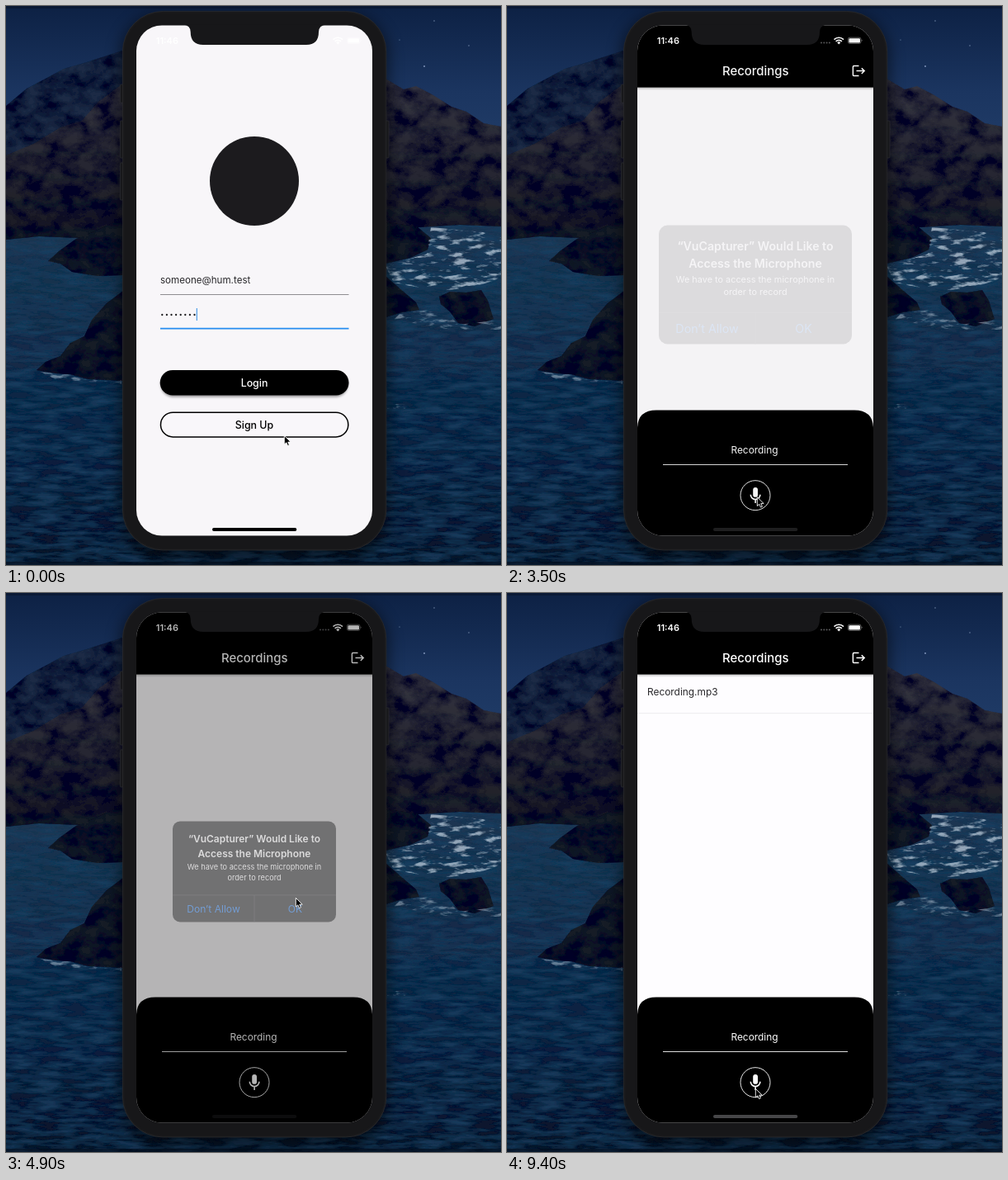
Write an HTML page that moves like this. It is 600 by 677 pixels and loops after 9500 ms.

```html
<!DOCTYPE html>
<html lang="en">
<head>
<meta charset="utf-8">
<title>Voice recorder demo</title>
<style>
html, body { margin: 0; width: 100%; height: 100%; overflow: hidden; background: #0b1a33; }
svg { position: absolute; left: 0; top: 0; width: 600px; height: 677px; display: block; }
text { font-family: Inter, Roboto, sans-serif; }
.mid { text-anchor: middle; }
.med { font-weight: 500; }
.bold { font-weight: 600; }
</style>
</head>
<body>
<svg viewBox="0 0 600 677">
  <defs>
    <linearGradient id="sky" x2="0" y2="1">
      <stop offset="0" stop-color="#0d2144"/>
      <stop offset=".35" stop-color="#1b3560"/>
      <stop offset="1" stop-color="#2b4a75"/>
    </linearGradient>
    <linearGradient id="sea" x2="0" y2="1">
      <stop offset="0" stop-color="#1c3652"/>
      <stop offset=".3" stop-color="#152d4a"/>
      <stop offset=".65" stop-color="#0c2140"/>
      <stop offset="1" stop-color="#061329"/>
    </linearGradient>
    <linearGradient id="hill" x2="0" y2="1">
      <stop offset="0" stop-color="#343440"/>
      <stop offset=".6" stop-color="#24252f"/>
      <stop offset="1" stop-color="#171a24"/>
    </linearGradient>
    <filter id="rough" x="0" y="0" width="1" height="1">
      <feTurbulence type="fractalNoise" baseFrequency=".045 .06" numOctaves="5" seed="7"/>
      <feColorMatrix values="0 0 0 0 0  0 0 0 0 0  0 0 0 0 .02  2.4 0 0 0 -.8"/>
      <feComposite in2="SourceGraphic" operator="in" result="n"/>
      <feMerge><feMergeNode in="SourceGraphic"/><feMergeNode in="n"/></feMerge>
    </filter>
    <filter id="waves" x="0" y="0" width="1" height="1">
      <feTurbulence type="fractalNoise" baseFrequency=".03 .16" numOctaves="4" seed="3"/>
      <feColorMatrix values="0 0 0 0 .01  0 0 0 0 .05  0 0 0 0 .12  1.8 0 0 0 -.62"/>
      <feComposite in2="SourceGraphic" operator="in" result="n"/>
      <feMerge><feMergeNode in="SourceGraphic"/><feMergeNode in="n"/></feMerge>
    </filter>
    <filter id="foam" x="0" y="0" width="1" height="1">
      <feTurbulence type="fractalNoise" baseFrequency=".05 .15" numOctaves="4" seed="11"/>
      <feColorMatrix values="0 0 0 0 .5  0 0 0 0 .6  0 0 0 0 .7  5 0 0 0 -2.6"/>
      <feComposite in2="SourceGraphic" operator="in"/>
    </filter>
    <filter id="soft" x="-20%" y="-20%" width="140%" height="140%"><feGaussianBlur stdDeviation="9"/></filter>
  </defs>
  <rect width="600" height="300" fill="url(#sky)"/>
  <g fill="#7f95b8"><circle cx="507" cy="73" r="1"/><circle cx="519" cy="18" r=".7"/><circle cx="561" cy="48" r=".7"/><circle cx="546" cy="125" r=".7"/><circle cx="477" cy="41" r=".6"/></g>
  <path d="M0 121L25 100 48 88 70 76 98 68 141 54V290H0Z" fill="#1b2b44" filter="url(#rough)"/>
  <rect y="264" width="600" height="413" fill="url(#sea)" filter="url(#waves)"/>
  <g fill="url(#hill)" filter="url(#rough)">
    <path d="M0 181L35 166 66 147 92 139 112 116 142 94V275L90 281 40 279 0 283Z"/>
    <path d="M460 88L482 101 497 97 518 108 540 122 558 128 579 142 600 146V267L550 265 500 268 460 300Z"/>
  </g>
  <g fill="#181c27" filter="url(#rough)">
    <path d="M51 309L64 297 85 282 105 274 142 257V326L110 327 80 322 66 312Z"/>
    <path d="M37 441L48 431 66 424 78 408 95 400 104 380 122 360 142 345V454L100 452 78 446 60 445Z"/>
    <path d="M460 262L498 267 515 281 511 295 490 305 460 312Z"/>
    <path d="M460 327L476 341 497 359 501 368 480 371 460 377Z"/>
    <path d="M525 352L538 346 558 347 576 344 584 357 591 379 568 388 548 384 538 370 527 361Z"/>
  </g>
  <path d="M515 268L600 276V330L560 342 520 345 470 335 460 315 510 300Z" fill="#fff" filter="url(#foam)" opacity=".75"/>
  <path d="M478 372L530 366 548 386 600 380V392L540 392 470 380ZM42 443L140 453V458L60 452ZM462 482h22v6h-22z" fill="#fff" filter="url(#foam)" opacity=".5"/>
  <rect width="600" height="3" fill="#081226" opacity=".5"/>
  <rect y="673" width="600" height="4" fill="#040c1c" opacity=".6"/>
  <rect x="138" y="10" width="326" height="660" rx="50" opacity=".5" filter="url(#soft)"/>
</svg>

<svg viewBox="0 0 600 677">
  <defs>
    <clipPath id="screen"><rect x="158" y="23.5" width="286" height="618" rx="31"/></clipPath>
    <linearGradient id="edge" x2="0" y2="1">
      <stop stop-color="#000" stop-opacity=".28"/><stop offset="1" stop-color="#000" stop-opacity="0"/>
    </linearGradient>
    <filter id="lift" x="-5%" y="-20%" width="110%" height="150%"><feGaussianBlur stdDeviation="1.6"/></filter>
  </defs>
  <g fill="#17181b" stroke="#303136" stroke-width=".6">
    <rect x="138.4" y="95" width="4" height="22" rx="1"/>
    <rect x="138.4" y="139" width="4" height="45" rx="1"/>
    <rect x="138.4" y="190" width="4" height="45" rx="1"/>
    <rect x="460" y="139" width="4" height="45" rx="1"/>
  </g>
  <rect x="141.4" y="6.4" width="319.4" height="652.6" rx="49" fill="#19191b" stroke="#2b2b2e" stroke-width=".8"/>
  <rect x="144" y="9" width="314" height="647.5" rx="46" fill="#171719"/>

  <g clip-path="url(#screen)">
    <g id="login">
      <rect x="158" y="23" width="286" height="619" fill="#f8f6f9"/>
      <circle cx="301" cy="212" r="54" fill="#1c1b1e"/>
      <text x="187" y="336" font-size="11.6" fill="#29282b">someone@hum.test</text>
      <path d="M187 349.5H415.5" stroke="#8f8d91"/>
      <g id="dots" fill="#1d1c1f"></g>
      <rect id="caret" x="230.7" y="366" width="1.3" height="15" fill="#5aa2e8"/>
      <path d="M187 390.7H415.5" stroke="#268df0" stroke-width="1.7"/>
      <rect x="187.5" y="443" width="227" height="30.5" rx="15.2" opacity=".4" filter="url(#lift)"/>
      <rect x="186.7" y="441" width="228.8" height="30.6" rx="15.3"/>
      <text class="mid med" x="301" y="461" font-size="12.4" fill="#fff">Login</text>
      <rect x="187.5" y="492.2" width="227.3" height="29.7" rx="14.8" fill="#f9f7fa" stroke="#000" stroke-width="1.5"/>
      <text class="mid med" x="301" y="511.6" font-size="12.4">Sign Up</text>
    </g>

    <g id="home">
      <rect x="158" y="23" width="286" height="619" fill="#fefdff"/>
      <rect x="158" y="98" width="286" height="4" fill="url(#edge)"/>
      <rect x="158" y="23" width="286" height="75.6"/>
      <text class="mid med" x="301.2" y="83.6" font-size="14.9" fill="#fff">Recordings</text>
      <path d="M426.5 72.6H420.6Q419.4 72.6 419.4 73.8V83.4Q419.4 84.6 420.6 84.6H426.5M423.5 78.6H433M429.8 75.2L433.2 78.6 429.8 82" fill="none" stroke="#fff" stroke-width="1.5"/>
      <g id="item">
        <text x="170" y="123.6" font-size="11.9" fill="#29282b">Recording.mp3</text>
        <path d="M158 145.7H444" stroke="#ebeaec" stroke-width=".9"/>
      </g>
      <path d="M158 642V512Q158 489.5 181 489.5H421Q444 489.5 444 512V642Z"/>
      <text class="mid" x="300" y="542.2" font-size="11.9" fill="#fff">Recording</text>
      <path d="M189 555.5H413" stroke="#dedede"/>
      <circle cx="301" cy="592.7" r="18" fill="none" stroke="#e8e8e8"/>
      <g id="mic">
        <rect x="298.2" y="583" width="5.8" height="11.8" rx="2.9" fill="#fff"/>
        <path d="M295.3 591.8A5.8 5.8 0 0 0 306.9 591.8M301.1 597.6V602" fill="none" stroke="#fff" stroke-width="1.6"/>
      </g>
      <rect id="stop" x="296.4" y="588" width="9.4" height="9.4" fill="none" stroke="#fff" stroke-width="2.2"/>
    </g>

    <rect id="bar" x="250" y="632" width="102.3" height="4" rx="2"/>
    <g fill="#fff">
      <text class="bold" x="181.8" y="45.6" font-size="11">11:46</text>
      <g fill="#5a5a5c" id="signal"><circle cx="381" cy="44.4" r="1"/><circle cx="384.3" cy="44.4" r="1"/><circle cx="387.6" cy="44.4" r="1"/><circle cx="390.9" cy="44.4" r="1"/></g>
      <path d="M396.5 40.6A8.2 8.2 0 0 1 408 40.6M398.6 42.9A5.2 5.2 0 0 1 405.9 42.9" fill="none" stroke="#fff" stroke-width="1.6"/>
      <path d="M400.2 44.2A3 3 0 0 1 404.3 44.2L402.25 46.4Z"/>
      <rect x="413.4" y="38.2" width="15.6" height="7.2" rx="2" fill="none" stroke="#fff" stroke-width=".6" opacity=".6"/>
      <rect x="414.4" y="39.2" width="13.6" height="5.2" rx="1.2"/>
      <path d="M429.8 40.5Q431.4 41.8 429.8 43.1Z" opacity=".7"/>
    </g>
    <rect id="dim" x="158" y="23" width="286" height="619"/>

    <g id="alert">
      <rect x="201" y="276" width="200" height="123" rx="9" fill="#343436"/>
      <path d="M201 366.2H401M301 366.2V399" stroke="#535356" stroke-width=".8"/>
      <g class="mid" fill="#fff">
        <text class="bold" x="301" y="302" font-size="12.1">“VuCapturer” Would Like to</text>
        <text class="bold" x="301" y="320.2" font-size="12.1">Access the Microphone</text>
        <text x="301" y="335.2" font-size="9.3">We have to access the microphone in</text>
        <text x="301" y="348.5" font-size="9.3">order to record</text>
      </g>
      <g class="mid" fill="#3788ee" font-size="12.2">
        <text x="251" y="387.4">Don’t Allow</text>
        <text x="351" y="387.4">OK</text>
      </g>
    </g>
  </g>

  <path d="M215 22.5Q223.7 23.5 223.7 31.5 223.7 47 239 47H364Q379 47 379 31.5 379 23.5 388 22.5Z" fill="#171719"/>
  <path id="cursor" d="M.3 .3V11L2.8 8.8 4.5 12.6 6.4 11.8 4.8 8.1H8.2Z" stroke="#fff" stroke-width=".9" stroke-linejoin="round"/>
</svg>

<script>
const LOOP = 9500, STEP = 100;
const $ = id => document.getElementById(id);
const set = (id, attrs) => {
  for (const k in attrs) $(id).setAttribute(k, attrs[k]);
};
const show = (id, on) => set(id, { visibility: on ? 'visible' : 'hidden' });
const smooth = p => p * p * (3 - 2 * p);

// Value at time t along [time, value] keys.
function track(t, keys, ease = p => p) {
  if (t <= keys[0][0]) return keys[0][1];
  for (let i = 1; i < keys.length; i++) {
    const [a, from] = keys[i - 1], [b, to] = keys[i];
    if (t < b) return from + (to - from) * ease((t - a) / (b - a));
  }
  return keys[keys.length - 1][1];
}

const cursorX = [[0, 337], [100, 323], [400, 323], [1000, 317], [2100, 317], [2900, 303],
  [4100, 303], [4700, 351], [5400, 351], [6600, 300], [6800, 300], [7200, 301]];
const cursorY = [[0, 520], [100, 508], [400, 508], [1000, 503], [2100, 503], [2900, 594.5],
  [4100, 594.5], [4700, 369], [5400, 369], [6600, 583], [6800, 583], [7200, 600]];
const caretFade = [[400, 1], [600, 0], [800, 0], [1000, 1]];
const dimming = [[3400, 0], [3500, .04], [3600, .32], [3700, .485], [3900, .5],
  [4700, .5], [4800, .41], [4900, .29], [5000, .12], [5100, 0]];
const alertFade = [[3400, 0], [3500, .12], [3600, .65], [3700, 1],
  [4700, 1], [4800, .78], [4900, .52], [5000, .2], [5100, 0]];
const alertScale = [[3500, 1.17], [3600, 1.045], [3700, 1], [4700, 1], [4900, .99]];
const barFade = [[3400, 1], [3500, .45], [3700, 0], [4700, 0], [4900, .25], [5100, 1]];

for (let i = 0; i < 8; i++) {
  const dot = document.createElementNS('http://www.w3.org/2000/svg', 'circle');
  dot.setAttribute('cx', 189.3 + i * 5.6);
  dot.setAttribute('cy', 374);
  dot.setAttribute('r', 1.15);
  $('dots').append(dot);
}

function draw(t) {
  const slide = 1 - (1 - track(t, [[1600, 0], [2100, 1]])) ** 3;
  const inside = slide > .5;
  set('login', { transform: `translate(${-95 * slide} 0)` });
  set('home', { transform: `translate(${286 * (1 - slide)} 0)` });
  show('login', slide < 1);
  show('home', slide > 0);
  show('signal', inside);
  set('caret', { opacity: track(t, caretFade) });

  const recording = t >= 5300 && t < 7800;
  show('mic', !recording);
  show('stop', recording);
  show('item', t >= 8300);

  set('bar', { fill: inside ? '#464648' : '#000', opacity: track(t, barFade) });
  set('dim', { opacity: track(t, dimming) });
  set('alert', {
    opacity: track(t, alertFade),
    transform: `translate(301 337.5) scale(${track(t, alertScale)}) translate(-301 -337.5)`
  });
  set('cursor', { transform: `translate(${track(t, cursorX, smooth)} ${track(t, cursorY, smooth)})` });
}

const start = performance.now();
function tick() {
  const t = (performance.now() - start) % LOOP;
  draw(Math.floor(t / STEP) * STEP);
  requestAnimationFrame(tick);
}
tick();
</script>
</body>
</html>
```
